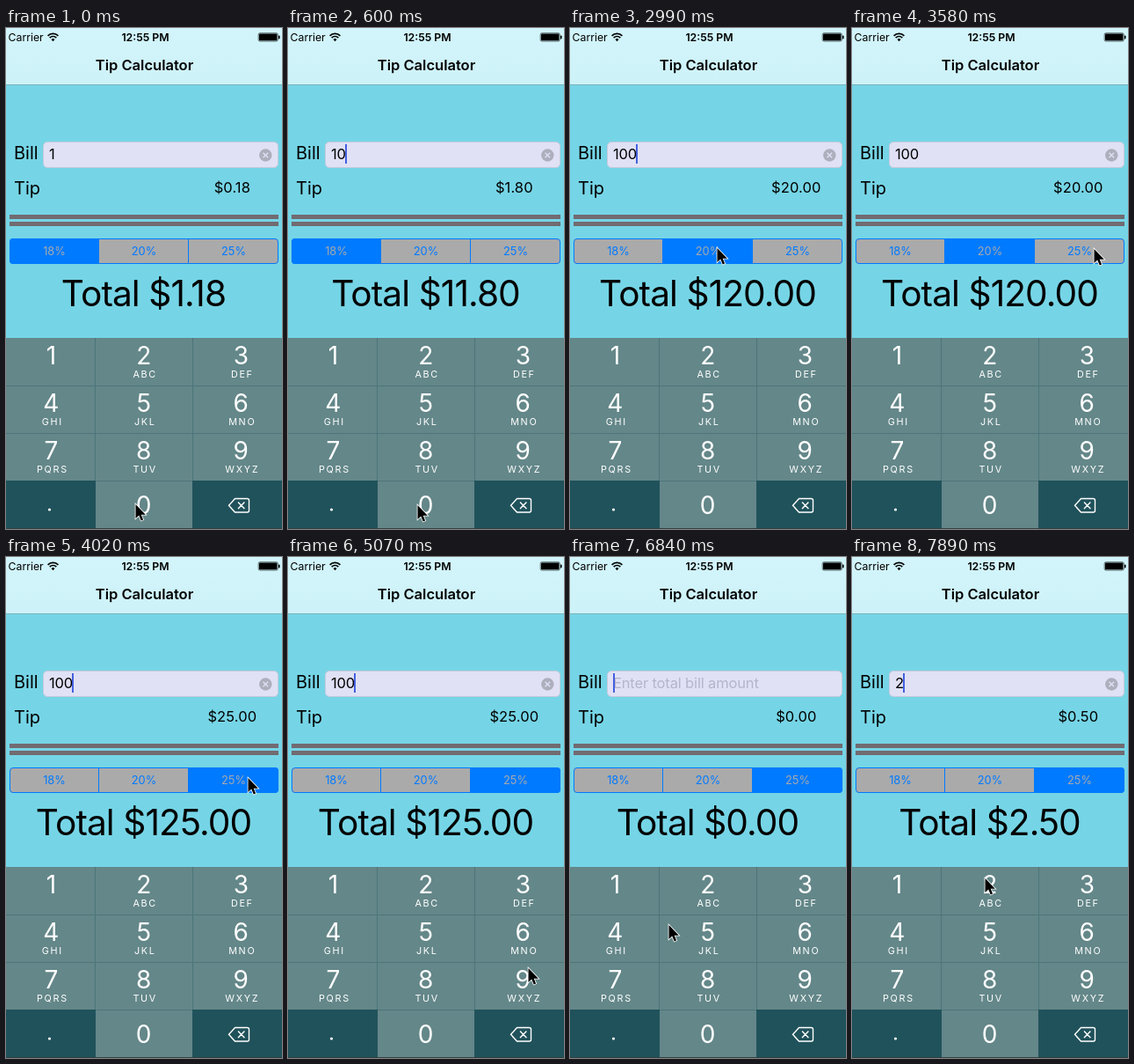
Animation of 314 by 569 pixels, one loop 8000 ms. Source, as an HTML page:

```html
<!DOCTYPE html>
<html lang="en">
<head>
<meta charset="utf-8">
<title>Tip Calculator</title>
<style>
  html, body { margin: 0; width: 100%; height: 100%; overflow: hidden; background: #75d5e6; }
  svg { display: block; width: 314px; height: 569px; font: 16.5px Inter, Roboto, sans-serif; font-optical-sizing: none; }
  .mid { text-anchor: middle; }
  .bold { font-weight: 600; }
  .status { font-size: 12.3px; }
  .label { font-size: 20px; }
  .seg { font-size: 12.8px; }
  .digit { font-size: 28px; fill: #fff; }
  .letters { font-size: 10.8px; letter-spacing: 1.7px; fill: #fff; }
  #total { font-size: 40.6px; letter-spacing: -.9px; }
  #tip { letter-spacing: .1px; }
  #bill { letter-spacing: -.2px; }
  #hint { fill: #b4b4cb; letter-spacing: -.15px; }
  #pointer { stroke: #fff; stroke-width: 1.6; paint-order: stroke; }
</style>
</head>
<body>
<svg viewBox="0 0 314 569">
  <defs>
    <linearGradient id="bar" x2="0" y2="1">
      <stop stop-color="#d2f5fb"/><stop offset="1" stop-color="#cdf2f8"/>
    </linearGradient>
    <clipPath id="round"><rect x="4" y="239" width="306" height="29" rx="4"/></clipPath>
  </defs>
  <rect width="314" height="569" fill="#75d5e6"/>

  <rect width="314" height="64" fill="url(#bar)"/>
  <rect y="64" width="314" height="1" fill="#78b4be"/>
  <text class="status" x="2.5" y="14.5">Carrier</text>
  <path d="M47.6 8.8a8.3 8.3 0 0 1 11.8 0M49.7 11.1a5.3 5.3 0 0 1 7.6 0" fill="none" stroke="#000" stroke-width="1.7"/>
  <path d="M53.5 15.2l-2-2.2a2.8 2.8 0 0 1 4 0z"/>
  <text class="status bold mid" x="158.5" y="14.5">12:55 PM</text>
  <rect x="287.2" y="5.8" width="22" height="9.2" rx="1.6" fill="none" stroke="#000" stroke-width=".6"/>
  <rect x="288" y="6.6" width="20.4" height="7.6" rx=".8"/>
  <rect x="310" y="8.5" width="1.5" height="4" rx=".7"/>
  <text class="bold mid" x="157.5" y="48">Tip Calculator</text>

  <text class="label" x="9" y="149">Bill</text>
  <rect x="42.5" y="129.5" width="267" height="29" rx="4.5" fill="#e0e1f5" stroke="#c3c9dc"/>
  <text id="hint" x="49" y="149">Enter total bill amount</text>
  <text id="bill" x="49" y="149"></text>
  <rect id="caret" y="132" width="2" height="22" fill="#4460e0"/>
  <g id="clear">
    <circle cx="295.3" cy="144.5" r="7.2" fill="#aeafbd"/>
    <path d="M292.5 141.7l5.6 5.6m0-5.6l-5.6 5.6" stroke="#e0e1f5" stroke-width="1.3"/>
  </g>
  <text class="label" x="9" y="189.3">Tip</text>
  <text id="tip" class="mid" x="257.3" y="187"></text>
  <path d="M4 214.5H310M4 222.5H310" stroke="#716b71" stroke-width="5"/>

  <g id="segments"></g>
  <text id="total" class="mid" x="156.5" y="316"></text>

  <rect y="352" width="314" height="217" fill="#648789"/>
  <path d="M0 406.5H314M0 460.5H314M0 514.5H314M101.5 352V569M212.5 352V569" stroke="#4c757b"/>
  <path d="M0 514H102V569H0zM212 514H314V569H212z" fill="#20525b"/>
  <g id="keys"></g>
  <circle cx="49.5" cy="547" r="1.6" fill="#fff"/>
  <path d="M253.5 542.3L260.5 534.5H274.5Q276.5 534.5 276.5 536.5V548Q276.5 550 274.5 550H260.5ZM264 538.6L271.4 546M271.4 538.6L264 546"
    fill="none" stroke="#fff" stroke-width="1.4" stroke-linejoin="round"/>
  <rect y="568" width="314" height="1" fill="#34403f"/>

  <path id="pointer" d="M.5 0V16L4.2 12.6 6.7 18.4 9.1 17.4 6.7 11.7H11.8Z"/>
</svg>
<script>
const $ = id => document.getElementById(id);
const LOOP = 8000;
const BLUE = '#007aff';
const rates = [18, 20, 25];

// [tick, bill, rate index, tick at which the caret blink starts]
const states = [
  [0, '1', 0, -6], [4, '10', 0, 4], [6, '100', 0, 6], [19, '100', 1, 6],
  [26, '100', 2, 6], [43, '', 2, 43.4], [53, '2', 2, 53]
];

// [tick, x, y] of the pointer tip
const path = [
  [0, 147, 541], [1, 147, 541], [2, 147, 542], [8, 147, 542], [15, 273, 287],
  [17, 155, 250], [19, 155, 250], [24, 275, 251], [29, 275, 251], [34, 273, 467],
  [35, 280, 522], [37, 303, 228], [41, 293, 143], [45, 293, 143], [46, 112, 418],
  [47, 114, 452], [49, 148, 387], [50, 148, 387], [52, 151, 365]
];

$('segments').innerHTML = '<g clip-path="url(#round)">' +
  rates.map((r, i) => `<rect class="cell" x="${4 + 102 * i - (i > 0)}" y="239" width="${102 + (i > 0)}" height="29"/>`).join('') +
  `</g><path d="M105.5 239V268M207.5 239V268" stroke="${BLUE}"/>` +
  `<rect x="4.5" y="239.5" width="305" height="28" rx="3.5" fill="none" stroke="${BLUE}"/>` +
  rates.map((r, i) => `<text class="seg mid" x="${55 + 102 * i}" y="258">${r}%</text>`).join('');
const cells = document.querySelectorAll('.cell');
const names = document.querySelectorAll('.seg');

const columns = [51.4, 156.7, 267.3];
const letters = ['', 'ABC', 'DEF', 'GHI', 'JKL', 'MNO', 'PQRS', 'TUV', 'WXYZ'];
$('keys').innerHTML = letters.map((s, i) => {
  const x = columns[i % 3], y = 352 + 54 * Math.floor(i / 3);
  return `<text class="digit mid" x="${x}" y="${y + 30}">${i + 1}</text>` +
    `<text class="letters mid" x="${x + 1.5}" y="${y + 45.3}">${s}</text>`;
}).join('') + '<text class="digit mid" x="156.5" y="551.5">0</text>';

// The screen refreshes in ticks of roughly 150 ms
const tickAt = t => Math.floor(t < 2550 ? t / 150 : 17 + (t - 2536) / 148.3);

function pointerAt(n) {
  const i = path.findIndex(p => p[0] > n);
  if (i < 0) return path[path.length - 1].slice(1);
  const [a, x, y] = path[i - 1], [b, u, v] = path[i];
  const k = (n - a) / (b - a);
  const s = b - a > 3 ? k * k * (3 - 2 * k) : k;
  return [Math.round(x + (u - x) * s), Math.round(y + (v - y) * s)];
}

function draw(t) {
  const n = tickAt(t);
  const [, bill, pick, start] = states.filter(s => s[0] <= n).pop();
  const tip = bill * rates[pick] / 100;
  $('bill').textContent = bill;
  $('tip').textContent = '$' + tip.toFixed(2);
  $('total').textContent = 'Total $' + (+bill + tip).toFixed(2);
  $('hint').style.display = bill ? 'none' : '';
  $('clear').style.display = bill ? '' : 'none';
  cells.forEach((c, i) => c.setAttribute('fill', i === pick ? BLUE : '#aaaaaa'));
  names.forEach((s, i) => s.setAttribute('fill', i === pick ? '#a5a9ae' : BLUE));

  const end = bill ? $('bill').getComputedTextLength() : 0;
  $('caret').setAttribute('x', Math.floor(49 + end));
  $('caret').style.display = (n - start) * .149 % 1 < .5 ? '' : 'none';
  $('pointer').setAttribute('transform', `translate(${pointerAt(n)})`);
}

const begin = performance.now();
function frame() {
  draw((performance.now() - begin) % LOOP);
  requestAnimationFrame(frame);
}
frame();
</script>
</body>
</html>
```
